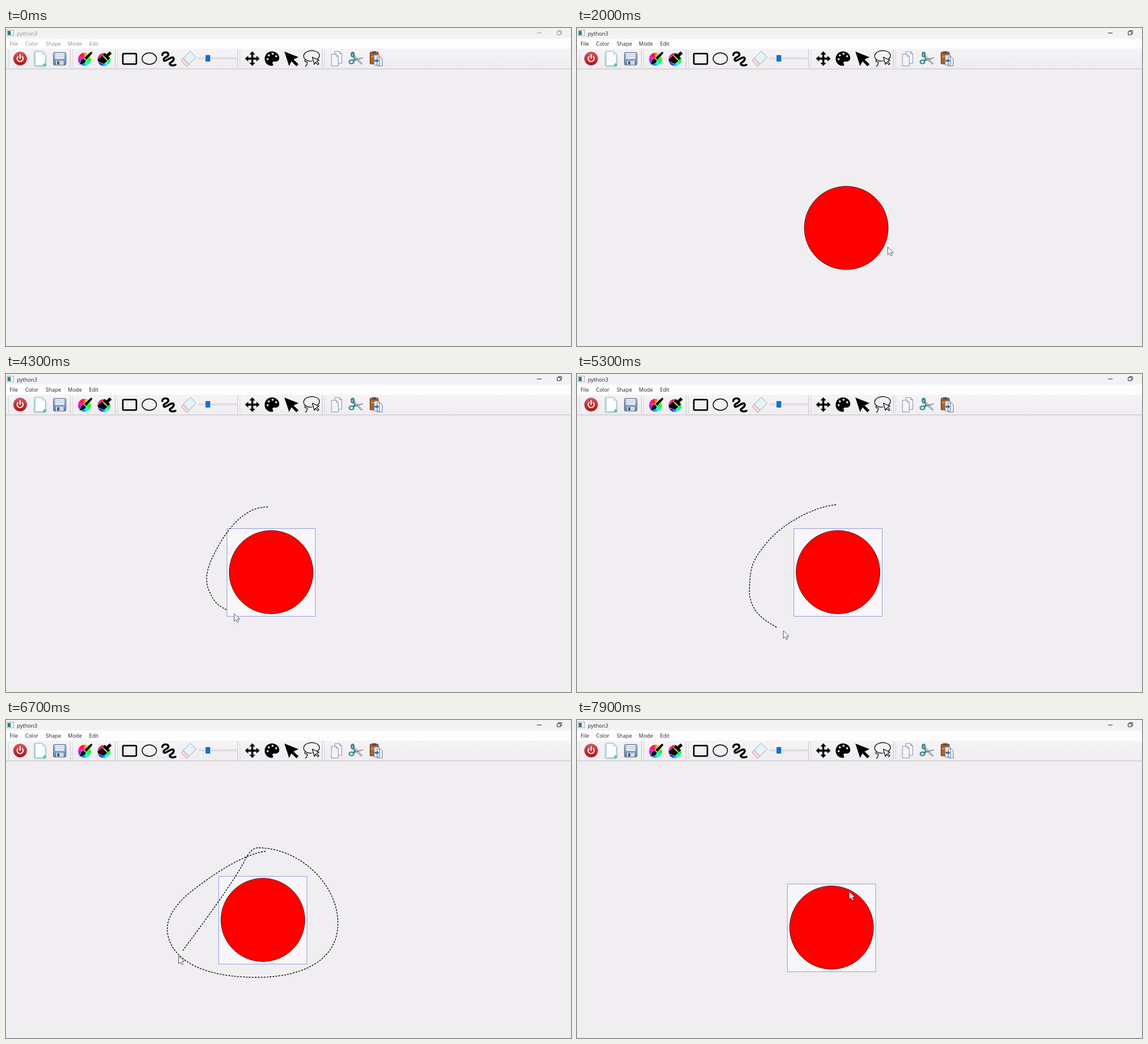
Recreate the animation shown at these times as an HTML page. Size 960x540 px, loop 8 s.

```html
<!DOCTYPE html>
<html lang="en">
<head>
<meta charset="utf-8">
<title>Paint window</title>
<style>
  html, body { margin: 0; width: 100%; height: 100%; overflow: hidden; background: #f0eef1; }
  svg { display: block; width: 960px; height: 540px; }
  text { font: 9px "Open Sans", "Noto Sans", sans-serif; }
  #title, #menu { --ink: #929094; }
  #title.on, #menu.on { --ink: #242326; }
  #title text, #menu text { fill: var(--ink); }
  #title path { stroke: var(--ink); fill: none; stroke-width: .9; }
  .line { fill: none; stroke: #000; stroke-linecap: round; stroke-linejoin: round; }
</style>
</head>
<body>
<svg viewBox="0 0 960 540">
  <defs>
    <linearGradient id="red" x2="0" y2="1"><stop stop-color="#e0575a"/><stop offset="1" stop-color="#b30d12"/></linearGradient>
    <linearGradient id="blue" x2="0" y2="1"><stop stop-color="#a3c2e2"/><stop offset="1" stop-color="#587fae"/></linearGradient>
    <linearGradient id="bar" x2="0" y2="1"><stop stop-color="#f5f3f6"/><stop offset="1" stop-color="#efedf0"/></linearGradient>
    <filter id="glow" x="-40%" y="-40%" width="180%" height="180%"><feGaussianBlur stdDeviation="1.4"/></filter>
  </defs>

  <rect width="960" height="540" fill="#f0eef1"/>
  <rect width="960" height="18" fill="#f3f1f4"/>
  <rect y="18" width="960" height="17" fill="#fdfdfe"/>
  <rect y="35" width="960" height="34" fill="url(#bar)"/>
  <rect y="69" width="960" height="1" fill="#c3c1c5"/>

  <g id="title">
    <rect x="2" y="3.500" width="11" height="9.500" fill="#e9f1f1" stroke="#98a2a4" stroke-width=".8"/>
    <rect x="3" y="5" width="5" height="7" fill="#2e7f80"/>
    <text x="18.500" y="12.500">python3</text>
    <path d="M902 8.500h8M936.500 6h5.500v5.500h-5.500zM938.500 6v-1.500h5.500v5.500h-2"/>
  </g>
  <g id="menu">
    <text x="6" y="29.500">File</text><text x="32.500" y="29.500">Color</text>
    <text x="67.500" y="29.500">Shape</text><text x="105" y="29.500">Mode</text><text x="141" y="29.500">Edit</text>
  </g>

  <path d="M109.500 36v32M185.500 36v32M393.500 36v32M537.500 36v32" stroke="#c9c7cb"/>
  <path d="M4.500 38v29M113.500 38v29M189.500 38v29M397.500 38v29M541.500 38v29" stroke="#b3b1b5" stroke-dasharray="1 1.500"/>

  <!-- power, new, save -->
  <circle cx="24" cy="52" r="11.300" fill="url(#red)" stroke="#9c5a5c"/>
  <path class="line" d="M20.300 48.600a5 5 0 1 0 7.400 0M24 45.500v6" style="stroke:#fff;stroke-width:2"/>
  <path d="M48.500 40h13l6 6v19h-19z" fill="#62bcbc" filter="url(#glow)"/>
  <path d="M49.500 40h12l5.500 5.500v18.500h-17.500z" fill="#fbfefd" stroke="#8fb9b6" stroke-width=".8"/>
  <path d="M61.500 40v5.500h5.500z" fill="#c6dedc"/>
  <path d="M65.500 59.500v6M62.500 62.500h6" stroke="#63bd8c" stroke-width="2"/>
  <rect x="80.500" y="41.500" width="21.500" height="21.500" rx="2" fill="url(#blue)" stroke="#66717e"/>
  <rect x="83.500" y="42.500" width="15.500" height="10" fill="#e6eef6"/>
  <path d="M84 45.500h14.500M84 48.500h14.500" stroke="#b7c9dc"/>
  <rect x="85" y="55.500" width="13" height="7" fill="#d5d8db"/>
  <rect x="87" y="56.500" width="3.500" height="5.500" fill="#44566b"/>

  <!-- colours -->
  <g id="wheels"></g>
  <g stroke="#fff" stroke-width=".6">
    <path d="M146.500 40.500q-2-1-4 1l-9.500 9 3.500 4 9-10q2-2 1-4z"/>
    <path d="M132 51.500l4 4q-1.500 7-12.500 6.500 3-1.500 3-5 .5-5 5.500-5.500z"/>
    <path d="M176 39.500l4 4-5.500 5 2.500 3-3.500 3.500-9.500-9.500 3.500-3.500 3 2.500z"/>
    <path d="M163 46.500l9.500 9.500-6.500 5.500-2-2-2 1-1.500-2.500-3 .5-2.500-5z"/>
  </g>

  <!-- shapes, eraser, size -->
  <rect class="line" x="198.500" y="43.500" width="23" height="17.800" rx="1.500" stroke-width="2.500"/>
  <ellipse class="line" cx="243.500" cy="52" rx="12.200" ry="9.800" stroke-width="1.500"/>
  <path class="line" d="M265.500 46C266 40 276 40 276 45S266 50 268 54.500 279 49 283 50 285 56 280 58.500 281 65.500 288 62.500" stroke-width="3.400"/>
  <path d="M313 39.500l10 10-12 12-10-10z" fill="#e3f3fb" stroke="#8e9aa2" stroke-width=".9"/>
  <path d="M301 51.500l10 10-4 4-9.500-10z" fill="#f9d8df" stroke="#bd8f9a" stroke-width=".9"/>
  <rect x="327.500" y="50" width="66" height="3" fill="#e3e1e4" stroke="#d5d3d7" stroke-width=".6"/>
  <rect x="339" y="46" width="8" height="11" fill="#0c74d2"/>

  <!-- modes -->
  <path d="M418.500 39.500l5 5.500h-3.300v5.300h5.300v-3.300l5.500 5-5.500 5v-3.300h-5.300v5.300h3.300l-5 5.500-5-5.500h3.300v-5.300h-5.300v3.300l-5.500-5 5.500-5v3.300h5.300v-5.300h-3.300z"/>
  <path d="M452 39.700c7 0 12.300 5 12.300 11 0 5-4 6.800-7.800 6.300-4-.5-4.500 2-3 4 1 2 0 3.300-2 3.300-7 0-12-5.500-12-12.300s5.500-12.300 12.500-12.300z"/>
  <g fill="#f3f1f5"><circle cx="444.500" cy="53" r="1.800"/><circle cx="446.500" cy="46.500" r="1.800"/><circle cx="453" cy="43.800" r="1.800"/><circle cx="459" cy="48" r="1.800"/></g>
  <path d="M473 40l24 9.500-8.500 4 8.500 8-3.500 3.500-8.500-8.500-4 8z"/>
  <path class="line" d="M510 54.500c-6-4-6-11 2-14.500s20-.500 20.500 6-7 9-11 9.500M520 56c-4 .8-7 0-10-1.500s-3 3.500 0 3 2.500 4-1 7.500" stroke-width="1.200"/>
  <path class="line" d="M520.500 49.500l11.500 5.300-4.300 1.600 4 4.200-1.700 1.700-4.200-4.200-1.800 4z" style="fill:#f5f3f6" stroke-width="1.100"/>

  <!-- copy, cut, paste -->
  <g fill="#f3f5fa" stroke="#7d89a6" stroke-width=".9">
    <path d="M558.500 40h8.500l3.500 3.500v16.500h-12z"/>
    <path d="M553 44.500h8l3.500 3.500v16.500h-11.500z"/>
    <path d="M561 44.500v3.500h3.500M567 40v3.500h3.500" fill="#c9d3ea"/>
  </g>
  <path d="M588 42l17.500 18.500-2 1L590 49zM606.500 50.500L590 56.500l-2-2z" fill="#c5cad0" stroke="#6d747b" stroke-width=".8"/>
  <g fill="none" stroke="#2f8790" stroke-width="2.200"><ellipse cx="589" cy="45" rx="2.400" ry="3.600"/><ellipse cx="587" cy="57.500" rx="3.800" ry="3"/><path d="M590 48l3 5-3 3"/></g>
  <rect x="618.500" y="41" width="14" height="20" rx="1" fill="#a9622c" stroke="#6f3d18"/>
  <rect x="622" y="39.500" width="7" height="4" fill="#54504e"/>
  <path d="M620.500 47h8v3h-8z" fill="#d08d4f"/>
  <path d="M625.500 46h9v17h-9zM630.500 49h6l3 3v12.500h-9z" fill="#e6e9f0" stroke="#737f98" stroke-width=".9"/>
  <path d="M626.500 54h3.500v-2l4 3.500-4 3.500v-2h-3.500z" fill="#3567b5"/>

  <!-- drawing -->
  <rect id="box" width="150" height="149" fill="#f8f6f9" stroke="#979fe4"/>
  <ellipse id="disc" fill="#f00" stroke="#3c0000" stroke-width=".8"/>
  <path id="lasso" class="line" stroke-width="1.300" style="stroke-linecap:butt"/>
  <path id="arrow" d="M0 0v13l3-2.800 2.200 4.600 2.300-1-2.200-4.500h4.200z" fill="#fff" stroke="#4a484c" stroke-width=".9" stroke-linejoin="round"/>
</svg>

<script>
const $ = id => document.getElementById(id);
const set = (id, attrs) => { for (const k in attrs) $(id).setAttribute(k, attrs[k]); };
const show = (id, on) => { $(id).style.display = on ? '' : 'none'; };
const clamp = p => Math.min(1, Math.max(0, p));
const smooth = p => p * p * (3 - 2 * p);
const mix = (a, b, p) => a.map((v, i) => v + (b[i] - v) * p);

const LOOP = 8000, STEP = 100;
const CORNER = [386, 268], DRAWN = 1900, LAG = 80;
const HOME = [382.5, 265.5], GRAB = [105, 13];

// Pointer stops before the first lasso: over the tools, drawing the disc, back up.
const stops = [
  { t: 100, at: [150, 62] }, { t: 500, at: [246, 56] }, { t: 900, at: [386, 281] }, { t: 1250, at: CORNER },
  { t: DRAWN, at: [529, 410] }, { t: 2400, at: [519, 44] }, { t: 2800, at: [468, 241] }
];

// A lasso has drawn pace * (elapsed steps) ^ gain pixels of its path.
const lassos = [
  { start: 2800, end: 3700, pace: 24.9, gain: 1.75,
    d: 'M468 241C444 237 425 235 404 255S355 305 342 334 360 462 430 462 533 420 533 350 500 220 455 212' },
  { start: 4100, end: 4700, pace: 109, gain: 1.15,
    d: 'M445 226C410 224 380 258 362 290S335 345 345 368 362 394 378 402 420 440 490 440 565 400 565 340 500 224 450 224' },
  { start: 5100, end: 5700, pace: 155, gain: 1,
    d: 'M440 222C400 226 348 255 322 287S295 328 293 362 310 415 341 431 430 442 470 438 562 380 562 330 490 208 440 208' },
  { start: 6200, end: 6800, pace: 220, gain: 1,
    d: 'M441 223C400 228 345 268 320 287S274 330 274 355 295 437 427 437C500 437 564 410 564 345S500 217 428 217C420 217 412 226 408 234C392 268 330 352 300 392' }
];

// Each drag swings the box out and brings it back to a new rest place.
const drags = [
  { start: 3700, end: 4100, to: [375.5, 262.5], swing: [-217, -160] },
  { start: 4700, end: 5100, to: [368.5, 262.5], swing: [-331, 0] },
  { start: 5700, end: 6100, to: [361.5, 265.5], swing: [-334, 0] },
  { start: 6800, end: 7400, to: [345, 222], swing: [10, 118] },
  { start: 7500, end: 7900, to: [357.5, 278.5], swing: [-42, 180] }
];

function pointer(t) {
  const i = Math.max(1, stops.findIndex(s => s.t > t));
  const a = stops[i - 1], b = stops[i];
  return mix(a.at, b.at, smooth(clamp((t - a.t) / (b.t - a.t))));
}

function boxAt(t) {
  let rest = HOME;
  for (const { start, end, to, swing } of drags) {
    if (t < start) break;
    const p = clamp((t - start) / (end - start));
    rest = mix(rest, to, p).map((v, i) => v + swing[i] * Math.sin(Math.PI * p));
  }
  return rest;
}

// Draws the lasso so far and returns where the pointer is, a little ahead of it.
function drawLasso({ start, pace, gain, d }, t) {
  const path = $('lasso');
  set('lasso', { d });
  const len = Math.min(path.getTotalLength(), pace * ((t - start) / STEP) ** gain);
  set('lasso', { 'stroke-dasharray': '3 2 '.repeat(Math.round(len / 5)) + '0 9999' });
  const tip = path.getPointAtLength(len), back = path.getPointAtLength(len - 1);
  return [tip.x + (tip.x - back.x) * 11, tip.y + (tip.y - back.y) * 11];
}

function draw(t) {
  $('title').classList.toggle('on', t >= 900);
  $('menu').classList.toggle('on', t >= 1000);

  const picked = t >= drags[0].start;
  const [x, y] = boxAt(t);
  const [right, bottom] = pointer(Math.min(t - LAG, DRAWN));
  const w = right - CORNER[0], h = bottom - CORNER[1];
  show('box', picked);
  set('box', { x, y });
  show('disc', t > 1300);
  set('disc', {
    cx: picked ? x + 75 : CORNER[0] + w / 2, cy: picked ? y + 74 : CORNER[1] + .5 + h / 2,
    rx: Math.max(0, w / 2 - .3), ry: Math.max(0, h / 2 - .3)
  });

  const lasso = lassos.find(l => t >= l.start && t < l.end);
  show('lasso', lasso);
  const tip = lasso ? drawLasso(lasso, t) : picked ? [x + GRAB[0], y + GRAB[1]] : pointer(t);
  show('arrow', t >= stops[0].t);
  set('arrow', { transform: `translate(${tip})` });
}

function wheel(cx, cy, r) {
  const rim = a => `${cx + r * Math.cos(a)} ${cy + r * Math.sin(a)}`;
  let out = '';
  for (let i = 0; i < 24; i++) {
    const a = i * Math.PI / 12;
    out += `<path d="M${cx} ${cy}L${rim(a)}A${r} ${r} 0 0 1 ${rim(a + .28)}z" fill="hsl(${120 + i * 15} 100% 52%)"/>`;
  }
  return out;
}
$('wheels').innerHTML = wheel(133.5, 53, 11) + wheel(166.5, 53.5, 11);

function tick() {
  draw(Math.floor(performance.now() % LOOP / STEP) * STEP);
  requestAnimationFrame(tick);
}
tick();
</script>
</body>
</html>
```
